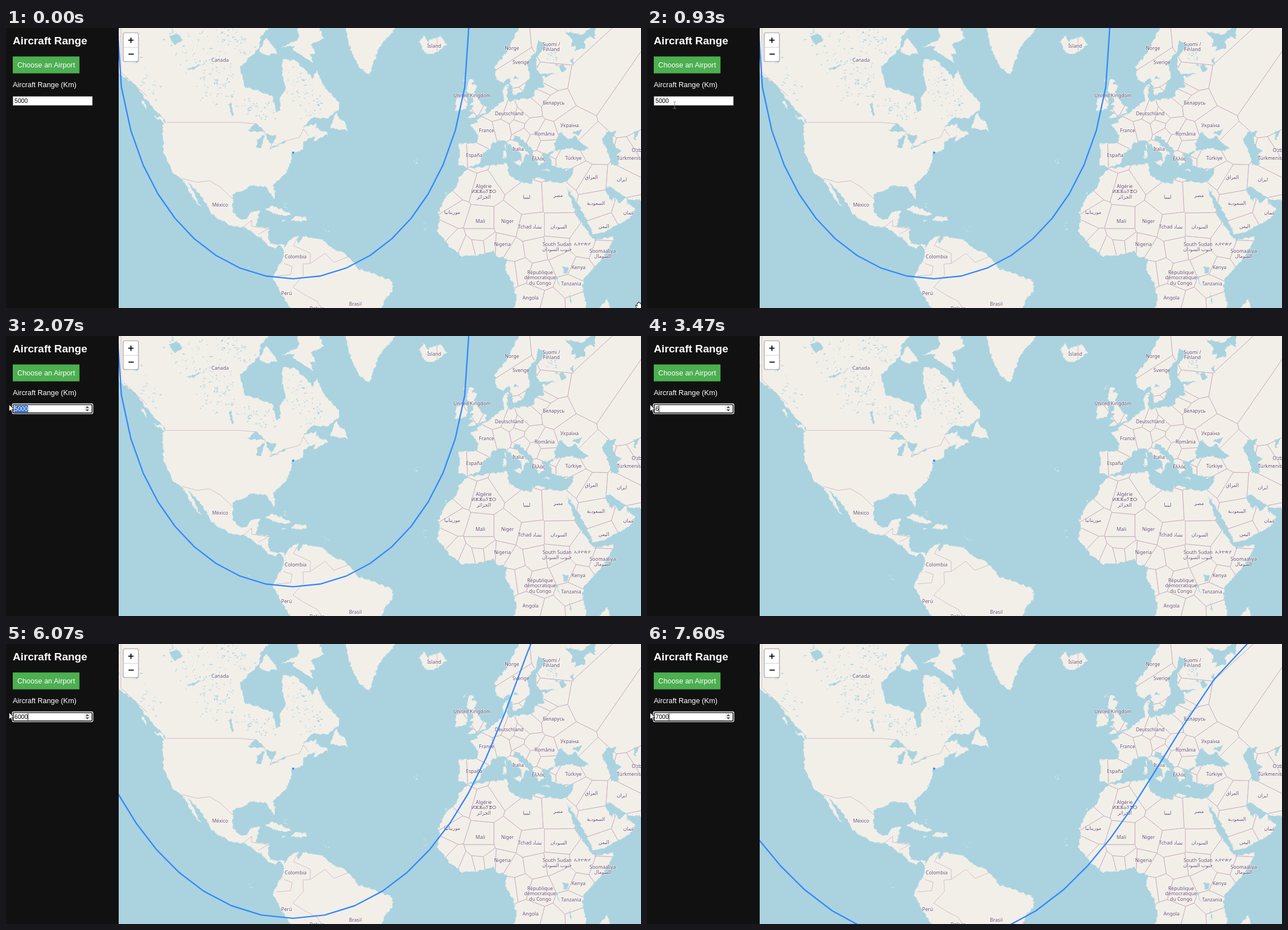
Write an HTML page that moves like this. It is 1127 by 497 pixels and loops after 8000 ms.

```html
<!DOCTYPE html>
<html lang="en">
<head>
<meta charset="utf-8">
<title>Aircraft Range</title>
<style>
html, body { margin: 0; width: 100%; height: 100%; overflow: hidden; background: #111; }
svg { display: block; width: 1127px; height: 497px; }
.ui { font-family: "Liberation Sans", Arial, sans-serif; font-size: 12.8px; fill: #fff; }
#labels { font: 8.6px "Noto Sans", "DejaVu Sans", sans-serif; text-anchor: middle; fill: #664d6e;
  stroke: #fff; stroke-opacity: .6; stroke-width: 1.6; paint-order: stroke; stroke-linejoin: round; }
#land { fill: #f2efe9; stroke: #f2efe9; stroke-width: .6; }
#lakes { fill: #aad3df; }
.borders { fill: none; stroke: #c7acbd; stroke-width: .75; stroke-linejoin: round; }
.cursor { fill: #fff; stroke: #111; stroke-width: .9; stroke-linejoin: round; }
</style>
</head>
<body>
<svg viewBox="0 0 1127 497">
  <defs>
    <filter id="coast" filterUnits="userSpaceOnUse" x="190" y="-10" width="947" height="517" color-interpolation-filters="sRGB">
      <feTurbulence type="fractalNoise" baseFrequency=".14" numOctaves="3" seed="4"/>
      <feDisplacementMap in="SourceGraphic" scale="6" xChannelSelector="R" yChannelSelector="G"/>
    </filter>
    <clipPath id="ashore"></clipPath>
  </defs>
  <rect x="200" width="927" height="497" fill="#aad3df"/>
  <g class="borders" id="under"></g>
  <g filter="url(#coast)"><g id="land"></g></g>
  <g class="borders" id="nations" clip-path="url(#ashore)"></g>
  <g class="borders" id="frontiers"></g>
  <g filter="url(#coast)"><g id="lakes"></g></g>
  <g id="labels"></g>
  <g fill="none" stroke="#3388ff" stroke-width="2.4" stroke-linejoin="round">
    <path id="range"/>
    <circle cx="509.5" cy="221.3" r="1" fill="#3388ff" stroke-width="2"/>
  </g>
  <rect x="208" y="8.5" width="27" height="51" rx="3" fill="#fff" stroke="#000" stroke-opacity=".25" stroke-width="1.7"/>
  <path d="M209 34.3H234" stroke="#ccc" stroke-width=".9"/>
  <path d="M217 21.7H226.4M221.7 17V26.4M217.4 46.4H226.8" stroke="#000" stroke-width="1.8"/>
  <rect width="200" height="497" fill="#111"/>
  <g class="ui">
    <text x="12" y="29.3" font-size="19.2" font-weight="bold">Aircraft Range</text>
    <rect x="12" y="50.5" width="118.4" height="30" fill="#4caf50"/>
    <text x="20" y="70">Choose an Airport</text>
    <text x="12" y="104.8">Aircraft Range (Km)</text>
    <rect x="12.3" y="121.3" width="141" height="16" fill="#fff" stroke="#767676" stroke-width=".8"/>
    <g id="focus" fill="none">
      <rect x="11.3" y="120.5" width="142.8" height="17.4" rx="1.8" stroke="#fff" stroke-width="1.3"/>
      <rect x="12.8" y="121.9" width="139.8" height="14.6" rx="1" stroke="#101010" stroke-width="1.4"/>
    </g>
    <g id="spin">
      <rect x="138.5" y="123" width="11.5" height="12.4" fill="#efefef"/>
      <path d="M141.2 128 144.3 124.6 147.4 128zM141.2 130.3 144.3 133.7 147.4 130.3z" fill="#505050"/>
    </g>
    <rect id="select" y="123.3" height="12.2" fill="#2f6bd0"/>
    <text id="value" x="15" y="133" font-size="10.67"></text>
    <rect id="caret" y="123.3" width="1" height="12" fill="#000"/>
  </g>
  <g class="cursor">
    <path id="arrow" d="M0 0V12.3L2.9 9.7 4.9 14 6.8 13.2 4.9 9H8.7z"/>
    <path id="beam" d="M-2.6-5.8H-.6L0-5.3 .6-5.8H2.6M0-5.3V5.3M-2.6 5.8H-.6L0 5.3 .6 5.8H2.6" fill="none"/>
    <path id="hand" d="M-3 6-6 1Q-6-1-4 0L-3 2-3-3Q-2-5-1-3V-5Q0-7 1-5V-4Q3-6 3-3V-2Q5-4 5-1V3L3 7H-2z"/>
  </g>
</svg>
<script>
// Key capes and bays only; the coast filter adds the fine crinkle.
const AMERICAS = {
  west: "200-9 200 80 229 100 263 145 285 166 278 172 280 222 297 257 313 268 326 274 401 304 403 294 427 285 438 279 462 281 477 306 475 278 497 256 498 231 508 225 509 219 500 170 480 151 471 120 424 105 415 70 449 35 452 15 474-9",
  east: "500 253 508 222 527 215 527 202 550 191 545 203 571 187 549 177 552 168 527 178 542 159 572 159 590 145 590 131 565 105 552 77 545 90 527 70 513 58 492 55 490 80 497 109 486 124 487 145 479 151 478 230",
  middle: "313 267 331 299 345 318 333 292 323 272 336 286 356 311 365 331 400 351 422 353 455 374 464 385 477 391 484 384 493 393 494 385 472 384 465 375 466 356 443 352 450 325 436 326 427 339 415 341 402 325 402 303 380 280 350 268",
  south: "493 393 493 407 477 434 475 446 494 480 510 504 666 504 670 485 686 467 684 449 656 438 627 429 617 417 599 398 586 397 565 380 562 376 527 370 520 382 517 381 519 368 508 373 496 386",
  baffin: "515-9 521 14 513 25 490 33 513 31 508 38 545 61 538 45 549 45 540 30 563 19 554-9",
  southampton: "449 40 463 18 481 43 462 49",
  greenland: "599-9 613 40 627 70 645 82 661 35 699-9",
  newfoundland: "576 177 586 150 590 160 601 166 605 182",
  vancouver: "262 155 277 160 284 171",
  haida: "240 130 246 130 249 144",
  cuba: "459 323 470 316 495 325 508 331 492 333",
  hispaniola: "507 341 513 334 531 336 535 340 520 343",
  jamaica: "489 340 498 342 492 343",
};
const OLD_WORLD = {
  africa: "818 250 849 246 889 241 893 262 917 275 934 278 935 269 944 265 958 272 992 275 997 293 1015 338 1044 377 1078 370 1075 381 1062 405 1024 446 1022 458 1030 494 1027 505 898 505 907 481 898 447 886 430 889 409 872 405 865 396 835 403 810 405 786 386 766 360 771 337 767 327 779 302 799 284 806 263",
  madagascar: "1068 481 1073 505 1045 506",
  europe: "976 218 951 223 954 238 945 244 933 214 910 192 901 191 901 199 929 224 922 223 916 238 915 225 891 205 884 198 862 204 859 213 846 223 841 239 820 248 804 243 805 216 803 206 836 204 839 191 824 171 837 169 836 162 863 147 876 133 894 130 929 124 980 120 1000 200",
  jutland: "884 133 882 117 884 106 892 100 889 120 894 132",
  north: "905 131 935 125 940 110 955 104 952 88 981 80 948 81 941 70 942 53 960 30 944 22 941 40 924 61 930 84 916 113 903 118 893 87 881 97 870 91 868 70 890 40 915-9 1137-9 1137 230 1000 230 970 215 940 190",
  britain: "819 160 829 158 851 152 852 140 845 138 831 114 836 101 826 101 831 92 822 92 817 110 831 130 824 136 831 140 821 147 831 150",
  ireland: "817 143 819 125 810 119 799 128 798 147",
  iceland: "734 24 741 13 748 24 771 14 782 30 759 47 742 42",
  sicily: "901 237 915 236 913 245",
  sardinia: "882 219 888 219 888 230 883 231",
  corsica: "885 207 887 207 887 216",
  crete: "952 251 964 252 963 254",
  cyprus: "991 253 1000 250 995 256",
  zealand: "895 114 903 113 900 120",
  arabia: "992 275 1004 265 1008 249 990 249 970 244 964 226 976 219 1015 205 1137 200 1137 307 1105 303 1072 281 1063 281 1064 289 1075 309 1078 301 1090 311 1100 301 1102 310 1116 320 1107 337 1063 361 1042 367 1039 356 1003 292 1004 284 1000 292 993 281",
};
const INLAND_WATER = {
  black: "976 218 972 207 984 184 997 197 1010 192 1033 215 1017 219 1004 213",
  azov: "1003 186 1022 180 1016 190",
  caspian: "1085 182 1067 185 1058 197 1069 222 1074 243 1089 243 1085 225 1092 216 1083 213 1076 197",
  aral: "1114 184 1124 182 1116 200",
  white: "992 6 1005 20 1003 34 1012 30 1010 40 1028 36 1026 24 1035 14 1044 19 1046-6 1030 6 1024 12",
  superior: "428 183 443 169 460 183 442 184",
  michigan: "446 213 445 200 459 189 452 213",
  huron: "461 188 479 191 474 205 466 203",
  erie: "466 215 474 210 487 208",
  ontario: "482 205 497 200 495 204",
  winnipeg: "395 136 400 131 405 157 401 157",
  slave: "320 74 346 63 335 73",
  bear: "289 15 303 9 314 20 300 30",
  victoria: "989 423 999 424 997 436 990 435",
  tanganyika: "975 440 978 440 985 464",
  malawi: "1000 469 1004 488 1001 485",
  ladoga: "982 70 988 63 994 73 987 80",
  onega: "1001 57 1006 53 1008 68",
  vanern: "900 91 905 86 909 89",
};
const FRONTIERS = "M204 0V78L250 121M285 167.5H414L443 170 458 183 472 205 469 214 498 200 521 194 528 179 537 192"
  + "M313 267 339 274 361 271 380 282 402 303M422 353 436 341V352L466 356M448 366 466 356"
  + "M518 372 510 386 540 400 540 418 527 419 528 439 509 460 531 474 552 485 562 500M480 440 505 438 508 423 493 418M540 418 566 400 582 416 610 405";

const LABELS = [
  [380, 60, "Canada"], [380, 317, "México"], [514, 409, "Colombia"], [498, 474, "Perú"], [620, 493, "Brasil"], [552, 501, "Bolivia"],
  [760, 35, "Ísland"], [898, 39, "Norge"], [968, 32, "Suomi /|Finland"], [914, 64, "Sverige"], [827, 123, "United Kingdom"],
  [893, 155, "Deutschland"], [972, 136, "Беларусь"], [853, 185, "France"], [1000, 176, "Україна"], [956, 191, "România"],
  [909, 218, "Italia"], [831, 229, "España"], [945, 235, "Ελλάς"], [1007, 234, "Türkiye"], [1134, 220, "Oʻzbekiston"],
  [1112, 234, "Türkmenistan"], [1093, 272, "ايران"], [1039, 268, "العراق"], [848, 284, "Algérie|ⵍⵣⵣⴰⵢⴻⵔ|الجزائر"],
  [924, 303, "ليبيا"], [980, 300, "مصر"], [1047, 314, "السعودية"], [1105, 331, "عمان"], [1061, 355, "اليمن"],
  [792, 330, "موريتانيا"], [842, 346, "Mali"], [890, 346, "Niger"], [930, 356, "Tchad تشاد"], [981, 356, "السودان"],
  [881, 387, "Nigeria"], [978, 387, "South Sudan|جنوب السودان"], [1023, 386, "ኢትዮጵያ"], [1059, 399, "Soomaaliya|الصومال"],
  [1016, 428, "Kenya"], [1003, 457, "Tanzania"], [948, 437, "République|démocratique|du Congo"], [931, 482, "Angola"],
];
// Centres of countries too small to carry a label.
const UNLABELLED = "928 142 912 160 908 172 932 177 938 200 957 208 949 118 954 107 962 92 1035 105 806 230 880 178 872 147 918 190 806 138 "
  + "1018 255 1040 216 1100 150 812 274 888 257 780 310 776 364 795 382 820 393 840 388 857 386 842 366 902 400 938 394 992 417 897 428 912 426 970 492 1015 490";

const $ = id => document.getElementById(id);
const polygons = shapes => Object.values(shapes).map(p => `<path d="M${p}z"/>`).join("");

let seed = 7;
const random = () => (seed = seed * 16807 % 2147483647) / 2147483647;

// Seeded small blots strewn along a line.
function scatter(count, [x, y], [dx, dy], spread, size = 1) {
  const blot = () => {
    const u = random(), cx = x + dx * u + (random() - .5) * spread, cy = y + dy * u + (random() - .5) * spread;
    const rx = size * (.6 + 2.2 * random() ** 2), ry = size * (.4 + .6 * random());
    return `<ellipse rx="${rx}" ry="${ry}" transform="translate(${cx} ${cy}) rotate(${random() * 90 - 70})"/>`;
  };
  return Array.from({ length: count }, blot).join("");
}

// The part of the map nearer to p than to any other centre.
function territory(p, centres) {
  let cell = [[765, -20], [1140, -20], [1140, 510], [765, 510]];
  for (const q of centres) {
    if (q === p) continue;
    const side = v => (v[0] - (p[0] + q[0]) / 2) * (q[0] - p[0]) + (v[1] - (p[1] + q[1]) / 2) * (q[1] - p[1]);
    cell = cell.flatMap((a, i) => {
      const b = cell[(i + 1) % cell.length], sa = side(a), sb = side(b), u = sa / (sa - sb);
      const kept = sa < 0 ? [a] : [];
      if (sa < 0 !== sb < 0) kept.push([a[0] + (b[0] - a[0]) * u, a[1] + (b[1] - a[1]) * u]);
      return kept;
    });
  }
  return `<path d="M${cell.map(v => v.map(n => n.toFixed(1)).join(" ")).join("L")}z"/>`;
}

const archipelagos = [[725, 235], [782, 291], [432, 428], [566, 355], [737, 349], [492, 313], [815, 88]];
$("land").innerHTML = polygons(AMERICAS) + polygons(OLD_WORLD)
  + archipelagos.map(p => scatter(5, p, [4, 3], 11, .4)).join("");
$("lakes").innerHTML = polygons(INLAND_WATER)
  + scatter(150, [315, 5], [75, 115], 75) + scatter(45, [420, 135], [50, 15], 30)
  + scatter(75, [510, 80], [35, 70], 45) + scatter(50, [375, 5], [55, 30], 30)
  + scatter(35, [963, 35], [14, 35], 22) + scatter(30, [225, 50], [45, 75], 25);
$("ashore").innerHTML = polygons(OLD_WORLD);
const centres = [...LABELS.filter(l => l[0] > 765), ...UNLABELLED.match(/\d+ \d+/g).map(s => s.split(" ").map(Number))];
$("nations").innerHTML = centres.map(p => territory(p, centres)).join("");
$("frontiers").innerHTML = `<path d="${FRONTIERS}"/>`;
$("labels").innerHTML = LABELS.map(([x, y, text]) =>
  text.split("|").map((line, i) => `<text x="${x}" y="${y + 9.3 * i}">${line}</text>`).join("")).join("");

// Great-circle ring around the airport, drawn in Mercator.
const LAT = 40.64 * Math.PI / 180;
function ring(km) {
  const d = km / 6371, points = [];
  for (let i = 0; i < 24; i++) {
    const b = i * Math.PI / 12;
    const sinLat = Math.sin(LAT) * Math.cos(d) + Math.cos(LAT) * Math.sin(d) * Math.cos(b);
    const lon = Math.atan2(Math.sin(b) * Math.sin(d) * Math.cos(LAT), Math.cos(d) - Math.sin(LAT) * sinLat);
    points.push((509.5 + 260.3 * lon).toFixed(1) + " " + (425.3 - 262.4 * Math.atanh(sinLat)).toFixed(1));
  }
  return "M" + points.join("L") + "z";
}

// Progress 0..1 in n jumps, the first at start and the last at end.
const jumps = (t, start, end, n) =>
  t < start ? 0 : Math.min(n, Math.floor((t - start) / (end - start) * (n - 1)) + 1) / n;
const bend = (a, b, c, u) => a * (1 - u) ** 2 + 2 * b * u * (1 - u) + c * u * u;

function pointer(t) {
  const sweep = jumps(t, 130, 930, 12), hover = jumps(t, 1000, 1130, 3);
  const drag = jumps(t, 1470, 1730, 4), settle = jumps(t, 2000, 2070, 2);
  return [bend(1123, -130, 49, sweep) - 5 * hover - 40 * drag + 1.5 * settle,
    bend(492, 230, 137, sweep) - 7 * hover - 3 * drag - 5.5 * settle];
}

function entry(t) {
  if (t < 3470) return "5000";
  const strokes = (start, pace) => Math.min(4, Math.floor((t - start) / pace) + 1);
  if (t < 6470) return "6000".slice(0, strokes(3470, 175));
  if (t < 7130) return "6000".slice(0, 4 - strokes(6470, 175));
  return "7000".slice(0, strokes(7130, 155));
}

const show = (id, on) => $(id).setAttribute("visibility", on ? "visible" : "hidden");
const DIGIT = 5.93;
let shown;

function draw(t) {
  const [x, y] = pointer(t), text = entry(t);
  const typing = t >= 3470, selecting = t >= 1470 && !typing;
  const blinkOff = t >= 4530 && t < 6070 && Math.floor((t - 4530) / 520) !== 1;
  const caret = typing && text !== "" && !blinkOff;
  const state = [x, y, text, selecting, caret].join();
  if (state === shown) return;
  shown = state;

  const kind = x > 200 ? "hand" : t >= 2000 || y > 143 ? "arrow" : "beam";
  for (const id of ["hand", "arrow", "beam"]) show(id, id === kind);
  $(kind).setAttribute("transform", `translate(${x} ${y})`);
  $("beam").setAttribute("stroke", t >= 1000 ? "#333" : "#888");

  show("focus", t >= 1470);
  show("spin", t >= 1000);
  show("select", selecting);
  const first = Math.min(4, Math.max(0, Math.round((x - 15) / DIGIT)));
  $("select").setAttribute("x", 15 + first * DIGIT);
  $("select").setAttribute("width", (4 - first) * DIGIT + .6);
  $("value").textContent = text || "Enter range";
  $("value").setAttribute("fill", selecting && first === 0 ? "#fff" : text ? "#000" : "#757575");
  show("caret", caret);
  $("caret").setAttribute("x", 14.8 + text.length * DIGIT);

  $("range").setAttribute("d", text ? ring(+text) : "");
}
function tick() {
  draw(performance.now() % 8000);
  requestAnimationFrame(tick);
}
tick();
</script>
</body>
</html>
```
